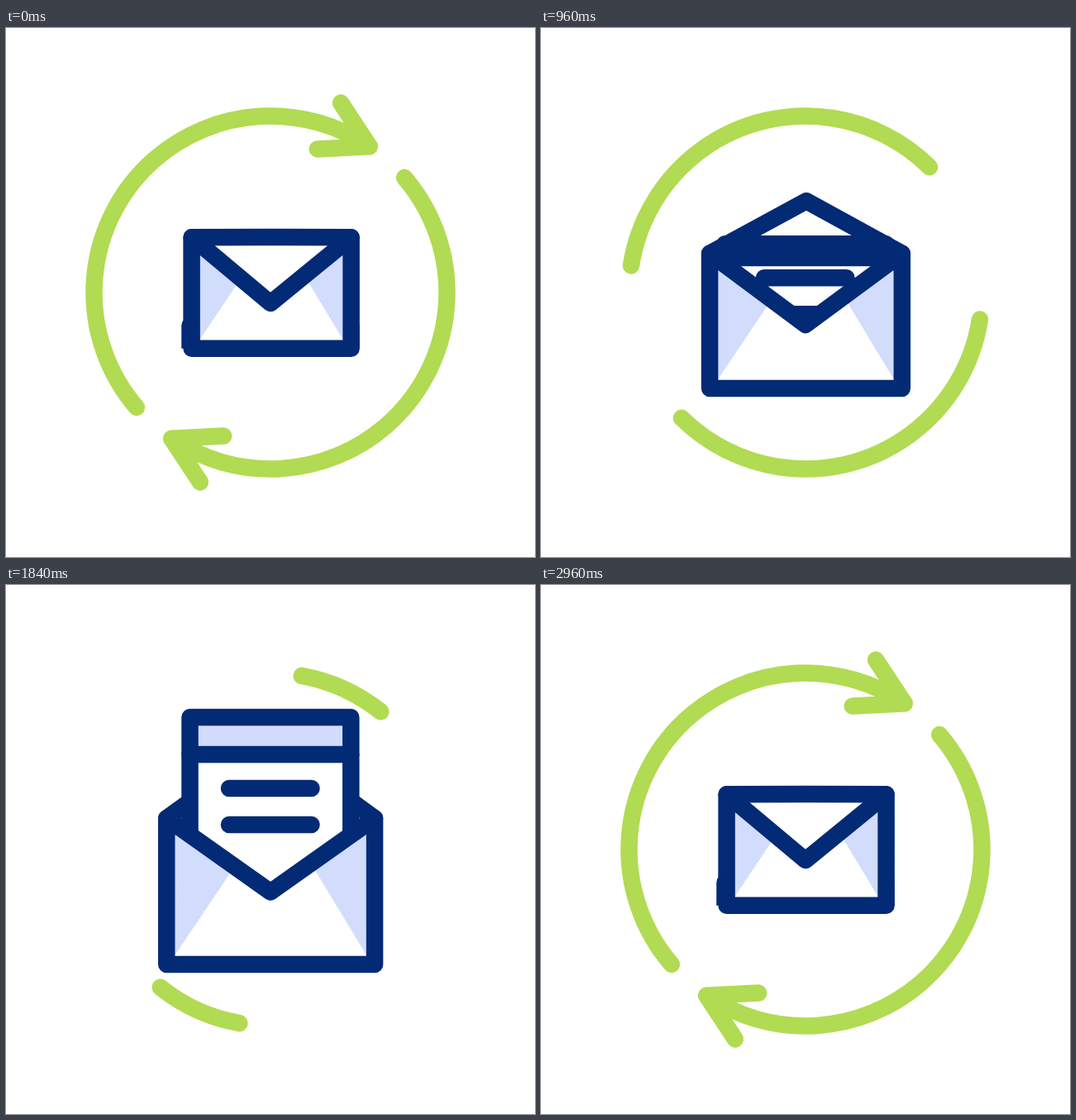
Animation, 640 px wide and 640 px high, one loop 3 s. Source, as an HTML page with a canvas:

```html
<!DOCTYPE html>
<html lang="en">
<head>
<meta charset="utf-8">
<title>Mail refresh</title>
<style>
  html, body { margin: 0; width: 100%; height: 100%; overflow: hidden; background: #fff; }
  canvas { display: block; width: 100vmin; height: 100vmin; margin: auto; }
</style>
</head>
<body>
<canvas id="stage" width="640" height="640"></canvas>
<script>
const LOOP = 3000, STEP = 40, LINE = 20.5;
const GREEN = '#b1db52', NAVY = '#032a75', PALE = '#d2dcfd', WHITE = '#fff';
const ctx = document.getElementById('stage').getContext('2d');

const rad = deg => deg * Math.PI / 180;
const linear = p => p;
const quad = p => p < .5 ? 2 * p * p : 1 - 2 * (1 - p) ** 2;
const cubic = p => p < .5 ? 4 * p ** 3 : 1 - 4 * (1 - p) ** 3;

// Value at time t along [time, value] keys.
function track(t, keys, ease = quad) {
  if (t <= keys[0][0]) return keys[0][1];
  for (let i = 1; i < keys.length; i++) {
    const [t0, v0] = keys[i - 1], [t1, v1] = keys[i];
    if (t < t1) return v0 + (v1 - v0) * ease((t - t0) / (t1 - t0));
  }
  return keys[keys.length - 1][1];
}

function shape(points, { fill, stroke, close = false }) {
  ctx.beginPath();
  points.forEach(([x, y]) => ctx.lineTo(x, y));
  if (close) ctx.closePath();
  if (fill) { ctx.fillStyle = fill; ctx.fill(); }
  if (stroke) { ctx.strokeStyle = stroke; ctx.stroke(); }
}

function drawArrows(t) {
  const turn = t < 1120
    ? track(t, [[120, 0], [660, 62.8], [1120, 0]], cubic)
    : t < 1540 ? 0
    : track(t, [[1800, -40], [2300, 19], [2360, 19], [2960, 0]]);
  const tailCut = t < 1540
    ? track(t, [[600, 0], [720, 12.9], [960, 38.8], [1240, 76], [1520, 164.7]], linear) : 0;
  const tipCut = t < 1540 ? 0 : track(t, [[1740, 164.7], [2080, 0]]);
  const barb = track(t, [[660, 63], [720, 42.5], [820, 0], [2100, 0], [2280, 63]], linear);
  const tail = 139.4 + turn + tailCut, tip = 304.1 + turn - tipCut;
  if (tip - tail < .1) return;

  const radius = 213.5;
  const x = radius * Math.cos(rad(tip)), y = radius * Math.sin(rad(tip));
  const barbEnd = side => {
    const back = rad(tip - 97.2 + side * 29.8);
    return [x + barb * Math.cos(back), y + barb * Math.sin(back)];
  };
  for (const side of [0, 180]) {
    ctx.save();
    ctx.translate(320, 320);
    ctx.rotate(rad(side));
    ctx.strokeStyle = GREEN;
    ctx.beginPath();
    ctx.arc(0, 0, radius, rad(tail), rad(tip));
    ctx.stroke();
    if (barb > 0) shape([barbEnd(1), [x, y], barbEnd(-1)], { stroke: GREEN });
    ctx.restore();
  }
}

function drawLetter(t, floor) {
  const top = track(t, [[720, 360], [1250, 160], [1900, 160], [2320, 360]]);
  const header = track(t, [[650, 400], [1150, 205], [1870, 205], [2290, 400]]);
  const left = 222.5, right = 417.3;
  const box = (y0, y1) => [[left, y0], [right, y0], [right, y1], [left, y1]];
  ctx.save();
  ctx.beginPath();
  ctx.rect(0, 0, 640, floor);
  ctx.clip();
  shape(box(top, top + 230), { fill: WHITE, close: true });
  if (header > top) shape(box(top, header), { fill: PALE, close: true });
  shape(box(top, top + 230), { stroke: NAVY, close: true });
  shape([[left, header], [right, header]], { stroke: NAVY });
  for (const gap of [41, 85]) {
    shape([[270, header + gap], [369.5, header + gap]], { stroke: NAVY });
  }
  ctx.restore();
}

function drawEnvelope(t) {
  const open = track(t, [[640, 0], [1200, 1], [1760, 1], [2210, 0]]);
  const left = 224.6 - 32.4 * open, right = 417.6 + 30.4 * open;
  const top = 253.2 + 31 * open, bottom = 387.8 + 76 * open;
  const fold = [320, 333 + 41 * open];
  const flap = [321, 253 - 66 * open ** .9];
  const topLeft = [left, top], topRight = [right, top];
  const onFold = (corner, x) =>
    [x, top + (fold[1] - top) * (x - corner) / (fold[0] - corner)];

  shape([topLeft, flap, topRight, fold], { fill: WHITE, close: true });
  shape([topLeft, flap, topRight], { stroke: NAVY });
  drawLetter(t, bottom);

  const pocket = [topLeft, fold, topRight, [right, bottom], [left, bottom]];
  shape(pocket, { fill: WHITE, close: true });
  shape([topLeft, onFold(left, 284 - 8 * open), [left + 10, bottom - 11], [left, bottom - 11]],
    { fill: PALE, close: true });
  shape([topRight, onFold(right, 361 + 8.5 * open), [right - 10, bottom - 11], [right, bottom - 11]],
    { fill: PALE, close: true });
  shape(pocket, { stroke: NAVY, close: true });
}

function render(now) {
  const t = Math.floor(now % LOOP / STEP) * STEP;
  ctx.fillStyle = WHITE;
  ctx.fillRect(0, 0, 640, 640);
  ctx.lineWidth = LINE;
  ctx.lineCap = ctx.lineJoin = 'round';
  drawArrows(t);
  drawEnvelope(t);
}

const start = performance.now();
function tick() {
  render(performance.now() - start);
  requestAnimationFrame(tick);
}
tick();
</script>
</body>
</html>
```
